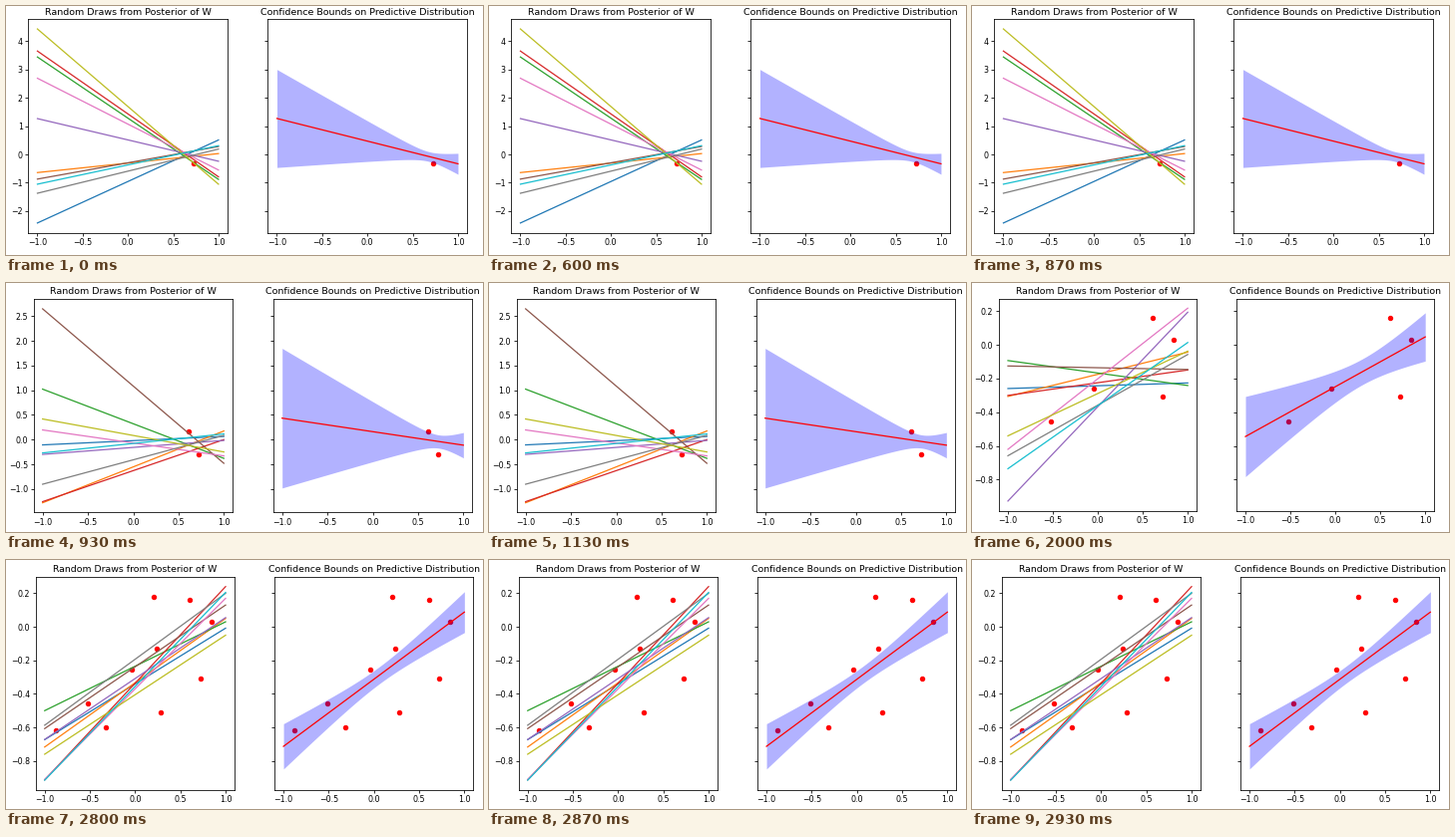
A matplotlib script that plays this animation: 478x250 px, repeating every 3740 ms.

```python
import numpy as np
import matplotlib.pyplot as plt
from matplotlib.animation import FuncAnimation
from matplotlib.ticker import MultipleLocator

W, H, DPI = 478, 250, 64
PX = 72 / DPI                      # points per pixel
LOOP, STEP = 3740, 22              # ms

POINTS = [(.72, -.307), (.607, .16), (.84, .028), (-.04, -.257), (-.52, -.455),
          (.2, .18), (.24, -.133), (.28, -.51), (-.32, -.6), (-.88, -.62)]

# box: left x of both axes, top, width, height (pixels)
# draws: line heights at x = -1 and x = 1, in colour-cycle order
# band: low and high at x = -1, low and high at x = 1, x of the waist
SCENES = [
    dict(start=0, box=(22.4, 262.4, 13.3, 199.6, 214.3), step=1, seen=1,
         draws=[(-2.42, .51), (-.64, .03), (3.44, -.88), (3.65, -.79), (1.265, -.24),
                (-.87, .28), (2.69, -.55), (-1.37, .19), (4.43, -1.05), (-1.05, .31)],
         band=(-.46, 3.0, -.7, .04, .68)),
    dict(start=930, box=(27.6, 267.6, 16.2, 199.8, 214.2), step=.5, seen=2,
         draws=[(-.107, .065), (-1.28, .175), (1.023, -.38), (-1.257, .0), (-.3, -.016),
                (2.65, -.48), (.196, -.33), (-.904, .085), (.418, -.25), (-.27, .115)],
         band=(-.98, 1.85, -.37, .145, .73)),
    dict(start=1870, box=(27, 265, 15.6, 198.2, 213), step=.2, seen=5,
         draws=[(-.259, -.226), (-.306, -.043), (-.093, -.241), (-.3, -.149), (-.927, .194),
                (-.125, -.146), (-.62, .218), (-.658, -.057), (-.54, -.037), (-.735, .014)],
         band=(-.782, -.306, -.096, .191, .3)),
    dict(start=2800, box=(29.7, 269, 17, 199.4, 213.8), step=.2, seen=10,
         draws=[(-.673, -.008), (-.717, .05), (-.5, .03), (-.913, .24), (-.672, .055),
                (-.607, .13), (-.91, .17), (-.587, .2), (-.76, -.05), (-.915, .205)],
         band=(-.848, -.578, -.034, .21, .06)),
]

fig = plt.figure(figsize=(W / DPI, H / DPI), dpi=DPI, facecolor="white")
plt.rcParams.update({"font.family": "DejaVu Sans", "axes.linewidth": .8 * PX})


def panel(scene, x, title, share=None):
    _, _, top, w, h = scene["box"]
    k = PX * w / 199.6
    ax = fig.add_axes((x / W, 1 - (top + h) / H, w / W, h / H),
                      sharey=share, label=f"{title} {scene['start']}")
    ax.set_title(title, fontsize=9.45 * k, pad=4.7 * k)
    ax.tick_params(labelsize=7.88 * k, length=2.8 * k, width=.8 * k, pad=2.8 * k,
                   labelleft=share is None)
    ax.xaxis.set_major_locator(MultipleLocator(.5))
    ax.yaxis.set_major_locator(MultipleLocator(scene["step"]))
    px, py = zip(*POINTS[:scene["seen"]])
    ax.scatter(px, py, s=(4.4 * k) ** 2, c="red", linewidths=1 * k)
    return ax


def spread(band, x):
    """Mean line and half width of a band with a hyperbolic outline."""
    lo0, hi0, lo1, hi1, c = band
    m0, m1 = (lo0 + hi0) / 2, (lo1 + hi1) / 2
    v0, v1 = ((hi0 - lo0) / 2) ** 2, ((hi1 - lo1) / 2) ** 2
    b = (v0 - v1) / (4 * c)
    a = v1 - b * (1 - c) ** 2
    mean = (m0 + m1) / 2 + (m1 - m0) / 2 * x
    return mean, np.sqrt(a + b * (x - c) ** 2)


def build(scene):
    xl, xr = scene["box"][:2]
    left = panel(scene, xl, "Random Draws from Posterior of W")
    for i, ends in enumerate(scene["draws"]):
        left.plot((-1, 1), ends, color=f"C{i}", lw=1.25 * PX)

    right = panel(scene, xr, "Confidence Bounds on Predictive Distribution", left)
    x = np.linspace(-1, 1, 100)
    mean, half = spread(scene["band"], x)
    right.fill_between(x, mean - half, mean + half, color="blue", alpha=.3, lw=0)
    right.plot(x, mean, color="red", lw=1.25 * PX)
    return left, right


panels = [build(s) for s in SCENES]
starts = [round(s["start"] / STEP) for s in SCENES]


def update(i):
    now = np.searchsorted(starts, i, side="right") - 1
    for n, pair in enumerate(panels):
        for ax in pair:
            ax.set_visible(n == now)
    return []


anim = FuncAnimation(fig, update, frames=LOOP // STEP, interval=STEP,
                     repeat=True, repeat_delay=0, blit=False)
plt.show()
```
